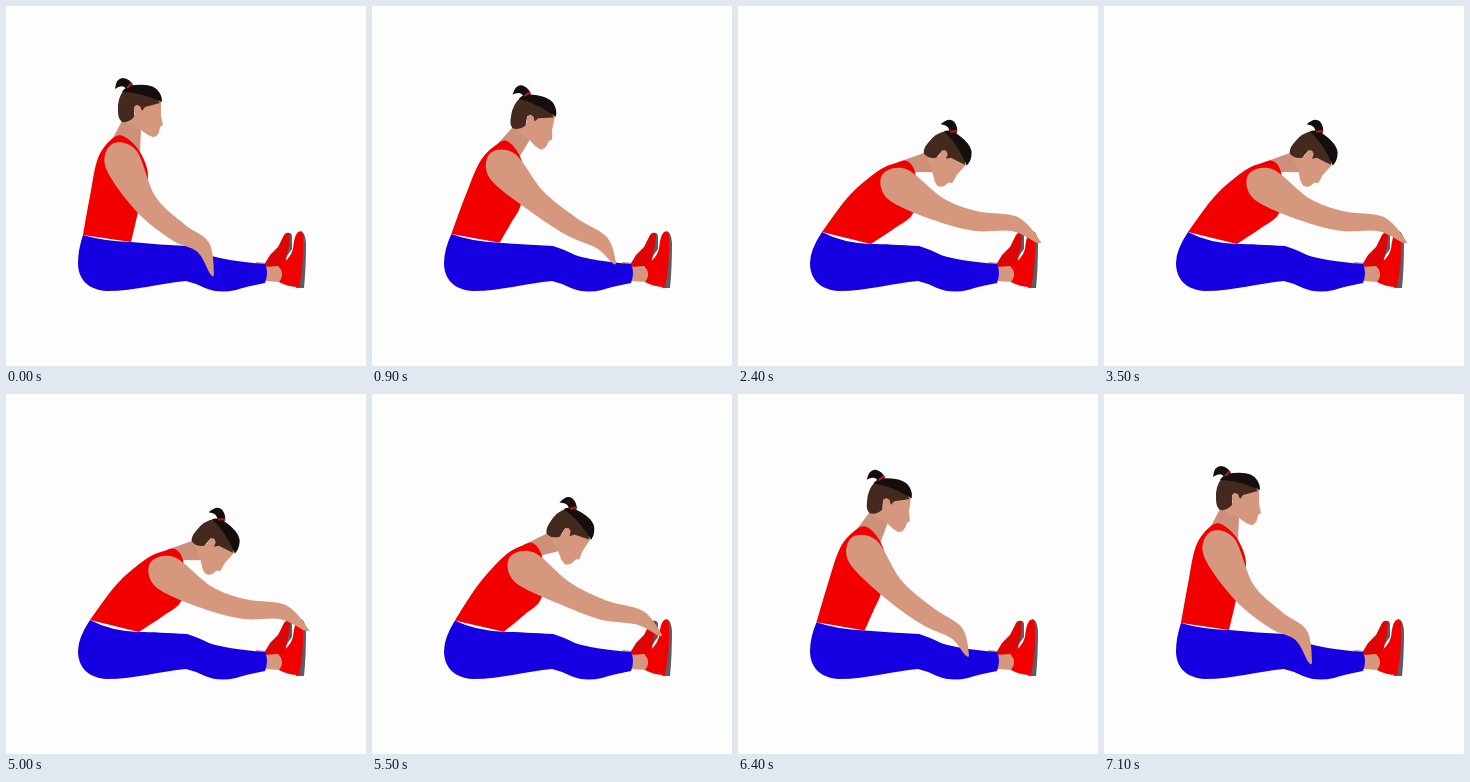
Animation, 360 px wide and 360 px high, one loop 7200 ms. Source, as an HTML page:

```html
<!DOCTYPE html>
<html lang="en">
<head>
<meta charset="utf-8">
<title>Seated forward bend</title>
<style>
html, body { margin: 0; height: 100%; overflow: hidden; background: #fdfdfd; }
svg { display: block; width: 100vw; height: 100vh; }
.red { fill: #f20000; }
.skin { fill: #d5977d; }
.shade { fill: #cd907a; }
.sole { fill: #5d5c60; }
.hair { fill: #150e0e; }
</style>
</head>
<body>
<svg viewBox="0 0 360 360">
  <path id="neck" class="shade"/>
  <path class="shade" d="M250 256L261 257 263 263 252 263Z"/>
  <path class="sole" d="M281 227Q286 226 286 231L286 243 278 254Z"/>
  <path fill="#de0505" d="M258 259L264 249 272 241 278 229Q281 225 284 228L283 240 279 258 264 263Z"/>
  <path class="skin" d="M259 261L272 260 278 268 274 276 258 275Z"/>
  <path class="sole" d="M294 225Q299 225 300 237Q300 262 298 282L290 282Z"/>
  <path class="red" d="M272 260Q284 254 287 243Q288 230 292 226Q296 224 297 230Q298 258 293 281Q282 281 273 276Q278 270 275 264Z"/>
  <path id="legs" fill="#1600e2"/>
  <path id="torso" class="red"/>
  <g id="head">
    <path class="skin" d="M134 91L155 94 155 110 157 119 154 121 153 126Q151 131 147 131L142 129 135 124 117 115 128 110Z"/>
    <path fill="#44291f" d="M118 84Q111 92 112 105Q112 113 116 116Q123 117 128 111L128 101 134 100 136 105 139 101 154 97 147 88 136 84Z"/>
    <path class="hair" d="M116 86Q119 80 129 79Q148 77 153 86Q156 90 156 96L146 92Q130 86 116 86Z"/>
    <path class="hair" d="M109 83Q110 72 117 72Q124 73 127 79L121 84Q117 77 109 83Z"/>
    <ellipse class="skin" cx="131" cy="104" rx="3.2" ry="5"/>
    <path fill="none" stroke="#c5150f" stroke-width="2" d="M121 82L126 77"/>
  </g>
  <path id="arm" class="skin"/>
</svg>
<script>
const LOOP = 7200;
const el = id => document.getElementById(id);
const draw = (id, d) => el(id).setAttribute('d', d);
const ease = (t, from, length) => {
  const u = Math.min(1, Math.max(0, (t - from) / length));
  return u * u * (3 - 2 * u);
};
const bendAt = t => ease(t, 0, 2280) - ease(t, 5000, 2000);

// Smooth curve through points; an open one ends with a straight edge
function curve(p, closed) {
  const n = p.length;
  const at = i => p[closed ? (i + n) % n : Math.min(n - 1, Math.max(0, i))];
  let d = 'M' + p[0];
  for (let i = 0; i < (closed ? n : n - 1); i++) {
    const [a, b, c, e] = [i - 1, i, i + 1, i + 2].map(at);
    d += 'C' + [b.map((v, j) => v + (c[j] - a[j]) / 6), c.map((v, j) => v - (e[j] - b[j]) / 6), c];
  }
  return d + 'Z';
}

// Outline of a limb from its joints and half-widths
function limb(joints, widths) {
  const left = [], right = [];
  let cap;
  joints.forEach(([x, y], i) => {
    const a = joints[Math.max(0, i - 1)], b = joints[Math.min(joints.length - 1, i + 1)];
    const len = Math.hypot(b[0] - a[0], b[1] - a[1]), w = widths[i];
    const dx = (b[0] - a[0]) / len * w, dy = (b[1] - a[1]) / len * w;
    if (!i) cap = [x - dx, y - dy];
    left.push([x + dy, y - dx]);
    right.unshift([x - dy, y + dx]);
  });
  return curve([cap, ...left, ...right], true);
}

function render(t) {
  const s = bendAt(t), arc = 4 * s * (1 - s);
  // From upright to bent, bowed by (bx, by) halfway
  const go = (x0, y0, x1, y1, bx = 0, by = 0) =>
    [x0 + (x1 - x0) * s + bx * arc, y0 + (y1 - y0) * s + by * arc];

  const tie = go(122, 79, 215, 124, 0, -8), turn = 42 * s - 3 * arc;
  const r = turn * Math.PI / 180, cos = Math.cos(r), sin = Math.sin(r);
  const onHead = (x, y) => [tie[0] + x * cos - y * sin, tie[1] + x * sin + y * cos];

  const waistL = go(77, 229, 84, 226), waistR = go(125, 236, 133, 238);
  const nape = go(107, 132, 158, 157, 1, -3), chest = go(134, 146, 177, 166, -1, -3);
  const back = [waistL, go(84, 190, 111, 190), go(92, 152, 140, 165, 0, -2), nape];
  const front = [go(119, 131, 169, 155, 0, -4), chest, go(142, 170, 178, 190),
    go(134, 198, 174, 209), go(130, 215, 157, 222, 0, -1), waistR];
  const shoulder = go(115, 153, 159, 178, 0, -2), elbow = go(140, 198, 200, 203, 3, -6);
  const forearm = go(172, 226, 238, 215, 5, -2), wrist = go(197, 241, 277, 218, 6, 4);
  const fingers = go(206, 267, 300, 235, 4, 0);
  const belt = `Q${(waistL[0] + waistR[0]) / 2 - 4} ${waistR[1] - 1} ${waistR}`;

  draw('torso', curve([...back, ...front]));
  draw('arm', limb([shoulder, elbow, forearm, wrist, fingers], [17.5, 12, 10, 7.5, 2]));
  draw('neck', `M${onHead(-5, 34)}L${nape} ${chest} ${onHead(13, 45)} ${onHead(10, 28)}Z`);
  draw('legs', `M${waistL}${belt}C145 238 163 239 181 240Q191 243 203 249Q220 255 259 258Q263 266 259 277
    Q238 281 230 284Q213 288 199 282Q189 277 180 275C155 277 130 285 101 285C83 284 72 274 72 257Q72 244 ${waistL}Z`);
  el('head').setAttribute('transform', `translate(${tie}) rotate(${turn}) translate(-122 -79)`);
}

const start = performance.now();
function tick() {
  const t = (performance.now() - start) % LOOP;
  render(Math.floor(t / 100) * 100);
  requestAnimationFrame(tick);
}
tick();
</script>
</body>
</html>
```
